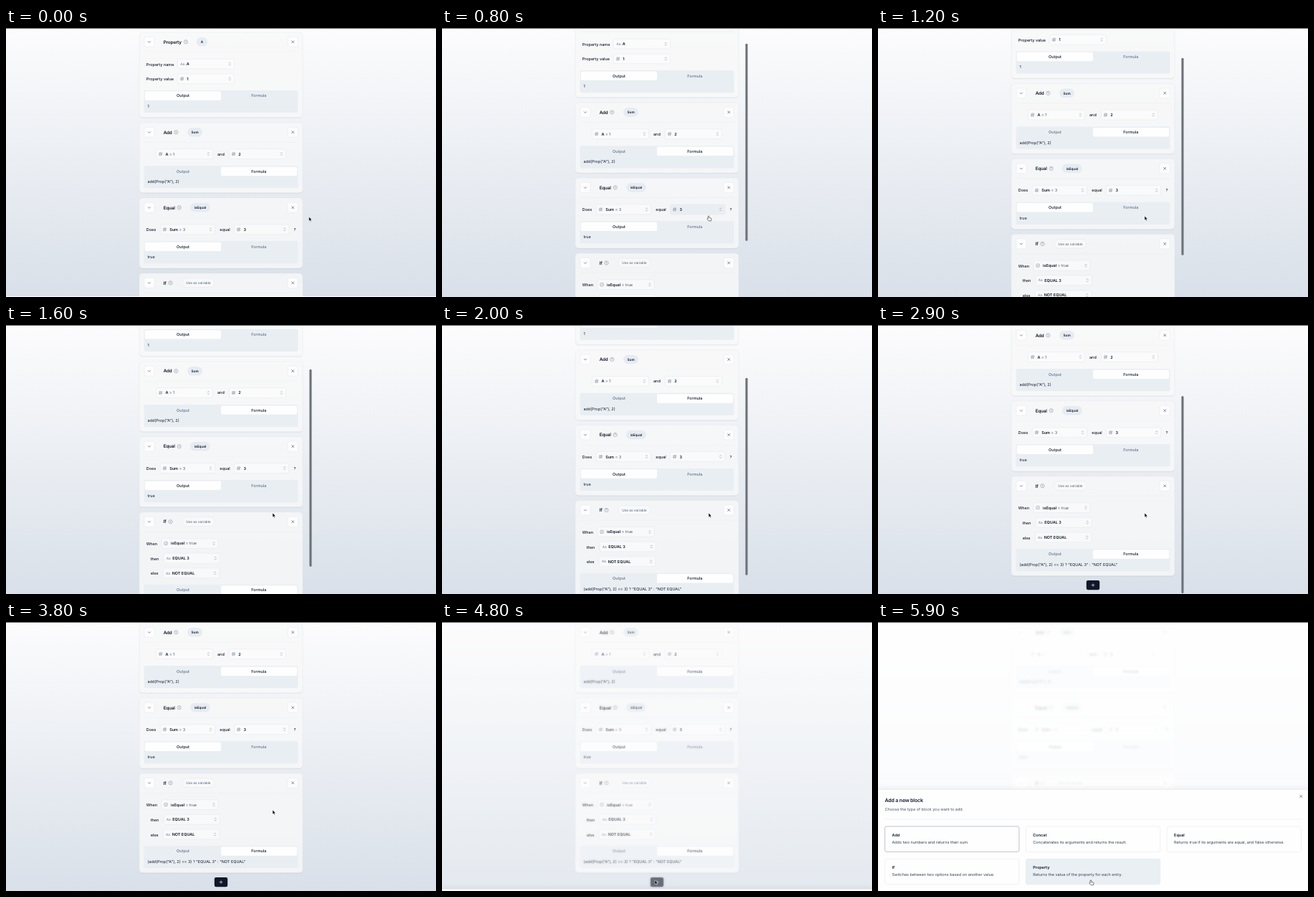
An HTML page for the animation above (6.1 s loop, 600x375 px).

```html
<!DOCTYPE html>
<html lang="en">
<head>
<meta charset="utf-8">
<title>Formula blocks</title>
<style>
html, body { margin: 0; width: 100%; height: 100%; overflow: hidden; }
body { position: relative; background: linear-gradient(#fcfcfd, #d9e0e9); }
svg, #veil { position: absolute; left: 0; top: 0; width: 600px; height: 375px; }
#veil { background: rgba(255, 255, 255, .8); backdrop-filter: blur(1.6px); }
text { font-family: Inter, "Liberation Sans", sans-serif; text-rendering: geometricPrecision; white-space: pre; }
#sheet { filter: drop-shadow(0 0 4px rgba(15, 23, 42, .1)); }
</style>
</head>
<body>
<svg viewBox="0 0 600 375"><g id="page"></g></svg>
<div id="veil"></div>
<svg viewBox="0 0 600 375">
  <rect id="thumb" x="423.4" width="3.1" height="275" rx="1.5" fill="#6d7278"/>
  <g id="sheet"></g>
  <g id="mouse">
    <path id="arrow" d="M0 0V5.9L1.4 4.7L2.3 6.8L3.3 6.4L2.4 4.4H4.2Z" fill="#000" stroke="#fff" stroke-width=".5"/>
    <path id="hand" transform="translate(-2 0)" d="M2 0Q2.8 0 2.8 .8V2.7L5.3 3.2Q6.1 3.4 6 4.3L5.5 6.9H2.1L.2 4.4Q-.2 3.7 .3 3.4Q.7 3.2 1.2 3.8V.8Q1.2 0 2 0Z" fill="#fff" stroke="#111" stroke-width=".55"/>
  </g>
  <rect width="600" height=".9" fill="#4a4c50"/>
  <rect id="edge" y="374" width="600" height="1" fill="#fff"/>
</svg>
<script>
const LOOP = 6100, STEP = 100;
const INK = '#0f172a', GRAY = '#64748b', LINE = '#dfe5ec', TINT = '#e9eef3';
const $ = id => document.getElementById(id);

// c is the vertical middle of the capitals
function text(x, c, s, { size = 5.47, w = 500, fill = INK, at = 'start', gap = 0 } = {}) {
  return `<text x="${x}" y="${c + size * .364}" font-size="${size}" font-weight="${w}" fill="${fill}"
    text-anchor="${at}" letter-spacing="${gap}em">${s}</text>`;
}
function box(x, y, w, h, r, fill, stroke = 'none', sw = .45, id = '') {
  return `<rect ${id && `id="${id}"`} x="${x}" y="${y}" width="${w}" height="${h}" rx="${r}" fill="${fill}" stroke="${stroke}" stroke-width="${sw}"/>`;
}
function stroke(d, color = INK, w = .5) {
  return `<path d="${d}" fill="none" stroke="${color}" stroke-width="${w}" stroke-linecap="round" stroke-linejoin="round"/>`;
}
const cross = (x, y, r) => stroke(`M${x - r} ${y - r}l${2 * r} ${2 * r}m0 ${-2 * r}l${-2 * r} ${2 * r}`);

const icons = {
  num: (x, c) => stroke(`M${x} ${c - 1}h4.8M${x - .2} ${c + 1}h4.8M${x + 1.7} ${c - 2.4}l-.6 4.8M${x + 3.7} ${c - 2.4}l-.6 4.8`, GRAY, .45),
  str: (x, c) => text(x, c, 'Aa', { size: 4.7, w: 400, fill: GRAY }),
  bool: (x, c) => box(x, c - 2.1, 4.3, 4.2, .7, 'none', GRAY) + stroke(`M${x + 1.2} ${c}l.8 .8l1.3 -1.5`, GRAY, .45)
};

function select(x, c, w, icon, value, rest = '', id = '') {
  const r = x + w - 6.2, gap = icon === 'str' ? 12.5 : 13;
  return box(x, c - 6.9, w, 13.8, 2.3, 'rgba(255,255,255,.4)', LINE, .45, id) +
    icons[icon](x + 3.9, c) +
    text(x + gap, c, `${value}<tspan font-weight="400" fill="#475569">${rest}</tspan>`, { w: 600 }) +
    stroke(`M${r - 1.1} ${c - 1}l1.1 -1.1l1.1 1.1M${r - 1.1} ${c + 1}l1.1 1.1l1.1 -1.1`, GRAY, .45);
}
const label = (x, c, s) => text(x, c + .6, s);

function header(top, title, help, pillX, pillW, pill, used) {
  const c = top + 13.3;
  return box(193, c - 7, 14, 14, 2.3, '#fdfdfe', LINE) +
    stroke(`M198.3 ${c - .6}l1.6 1.6l1.6 -1.6`) +
    text(219.7, c, title, { size: 6.25, w: 600, gap: -.025 }) +
    `<circle cx="${help}" cy="${c}" r="2.6" fill="none" stroke="${GRAY}" stroke-width=".45"/>` +
    text(help, c, '?', { size: 3.7, fill: GRAY, at: 'middle' }) +
    box(pillX, c - 6.3, pillW, 12.6, 6.3, used ? '#e6ecf2' : 'rgba(255,255,255,.35)', used ? 'none' : LINE) +
    text(pillX + pillW / 2, c, pill, { size: 4.69, w: used ? 600 : 500, fill: used ? INK : GRAY, at: 'middle' }) +
    box(393.2, c - 7, 14, 14, 2.3, '#fdfdfe', LINE) + cross(400.2, c, 1.5) +
    stroke(`M193 ${top + 27.3}H407`, '#e6eaef', .4);
}

function tabs(bottom, on, result) {
  const c = bottom - 30.1;
  const tab = (i, s) => text(i ? 352.8 : 247, c, s, { fill: on === i ? INK : GRAY, at: 'middle' });
  return box(192.6, c - 7.6, 214.8, 31.2, 2.3, TINT) +
    box(on ? 300 : 193.8, c - 6.2, 106.2, 12.4, 1.8, '#fefefe') +
    tab(0, 'Output') + tab(1, 'Formula') +
    text(197.4, c + 14.4, result, { w: 400 });
}

function card(top, bottom, head, body, on, result) {
  return box(186, top + .7, 228, bottom - top + .6, 4.7, 'rgba(15,23,42,.05)') +
    box(186, top, 228, bottom - top, 4.7, 'rgba(252,252,252,.8)', '#e0e5eb') +
    header(top, ...head) + body + tabs(bottom, on, result);
}

$('page').innerHTML =
  card(6, 124.6, ['Property', 251, 266, 15, 'A', true],
    label(195.7, 50.1, 'Property name') + select(239.3, 50.1, 79.2, 'str', 'A') +
    label(195.7, 70.8, 'Property value') + select(239.3, 70.8, 79.2, 'num', '1'),
    0, '1') +
  card(132, 229.8, ['Add', 237.3, 253.2, 20.8, 'Sum', true],
    select(209.4, 175.6, 79.2, 'num', 'A', ' = 1') + label(295, 175, 'and') + select(311.3, 175.6, 79.2, 'num', '2'),
    1, 'add(Prop("A"), 2)') +
  card(237, 334.9, ['Equal', 241.7, 257, 27.8, 'isEqual', true],
    label(195.7, 280.2, 'Does') + select(215.2, 280.8, 76.5, 'num', 'Sum', ' = 3') +
    label(298.3, 280.2, 'equal') + select(318.4, 280.8, 76.5, 'num', '3', '', 'pick') + label(401.6, 280.2, '?'),
    0, 'true') +
  card(342, 480.6, ['If', 229.5, 246, 45, 'Use as variable', false],
    label(195.7, 385.8, 'When') + select(217, 385.6, 79.2, 'bool', 'isEqual', ' = true') +
    label(201.7, 406.2, 'then') + select(219.8, 406.2, 78.6, 'str', 'EQUAL 3') +
    label(201.7, 427, 'else') + select(219.2, 427, 78.6, 'str', 'NOT EQUAL'),
    1, '(add(Prop("A"), 2) == 3) ? "EQUAL 3" : "NOT EQUAL"') +
  box(290.8, 487, 18.4, 13.2, 2.3, INK, 'none', 0, 'plus') +
  stroke('M298 493.6h4M300 491.6v4', '#fff', .6);

const choices = [
  ['Add', 'Adds two numbers and returns their sum.'],
  ['Concat', 'Concatenates its arguments and returns the result.'],
  ['Equal', 'Returns true if its arguments are equal, and false otherwise.'],
  ['If', 'Switches between two options based on another value.'],
  ['Property', 'Returns the value of the property for each entry.']
];
$('sheet').innerHTML = box(0, 233.6, 600, 145, 0, '#fefefe', LINE) +
  text(9.5, 248.6, 'Add a new block', { size: 7.03, w: 600, gap: -.025 }) +
  text(9.5, 261.3, 'Choose the type of block you want to add.', { w: 400, fill: '#475569' }) +
  cross(590.3, 243, 1.6) + stroke('M9.5 275.2H590.5', LINE, .45) +
  choices.map(([name, info], i) => {
    const x = 9.6 + i % 3 * 196.8, y = i < 3 ? 284.9 : 330.3;
    return box(x, y, 187.3, 35.5, 2.6, '#fefefe', LINE, .5, name) +
      text(x + 9.9, y + 12.2, name, { w: 600 }) +
      text(x + 9.9, y + 21.7, info, { w: 400, fill: '#334155' });
  }).join('');

const linear = p => p;
const smooth = p => p * p * (3 - 2 * p);
// value at t along a list of [time, value]
function track(keys, t, ease = linear) {
  const i = keys.findIndex(k => k[0] > t);
  if (i === 0) return keys[0][1];
  if (i < 0) return keys[keys.length - 1][1];
  const [t0, a] = keys[i - 1], [t1, b] = keys[i];
  return a + (b - a) * ease((t - t0) / (t1 - t0));
}

const SCROLL = [[500, 0], [800, 27.9], [1600, 81.1], [2300, 109.4], [2900, 131]];
const MOUSE_X = [[300, 422.7], [600, 372], [3900, 372], [4600, 297]];
const MOUSE_Y = [[300, 263.2], [600, 262], [3900, 262], [4600, 359.8]];
const THUMB = [[3400, 1], [3800, 0]];
const VEIL = [[4740, 0], [4900, 1]];
const SLIDE = [[4755, 142], [5255, 0]];

function draw(t) {
  const y = track(SCROLL, t);
  const over = t >= 500 && y > 8 && y < 29;
  const hand = over || t >= 5900;
  $('page').setAttribute('transform', `translate(0 ${-y})`);
  $('pick').setAttribute('fill', over ? TINT : 'rgba(255,255,255,.4)');
  $('plus').setAttribute('fill', t >= 4500 ? '#272e3f' : INK);
  $('thumb').setAttribute('y', 1 + y * .748);
  $('thumb').style.opacity = t > 500 ? track(THUMB, t) : 0;

  const veil = track(VEIL, t);
  $('veil').style.opacity = veil;
  $('veil').style.display = veil ? 'block' : 'none';
  $('sheet').style.display = t > 4755 ? '' : 'none';
  $('sheet').setAttribute('transform', `translate(0 ${track(SLIDE, t, smooth)})`);
  $('Property').setAttribute('fill', t >= 5200 ? '#eaeff4' : '#fefefe');
  $('Add').setAttribute('stroke', t >= 5900 ? '#7c8a9e' : LINE);

  $('mouse').setAttribute('transform', `translate(${track(MOUSE_X, t, smooth)} ${track(MOUSE_Y, t, smooth)})`);
  $('arrow').style.display = hand ? 'none' : '';
  $('hand').style.display = hand ? '' : 'none';
  $('edge').style.display = t < 100 ? '' : 'none';
}

const start = performance.now();
function tick() {
  const t = (performance.now() - start) % LOOP;
  draw(Math.floor(t / STEP) * STEP);
  requestAnimationFrame(tick);
}
tick();
</script>
</body>
</html>
```
